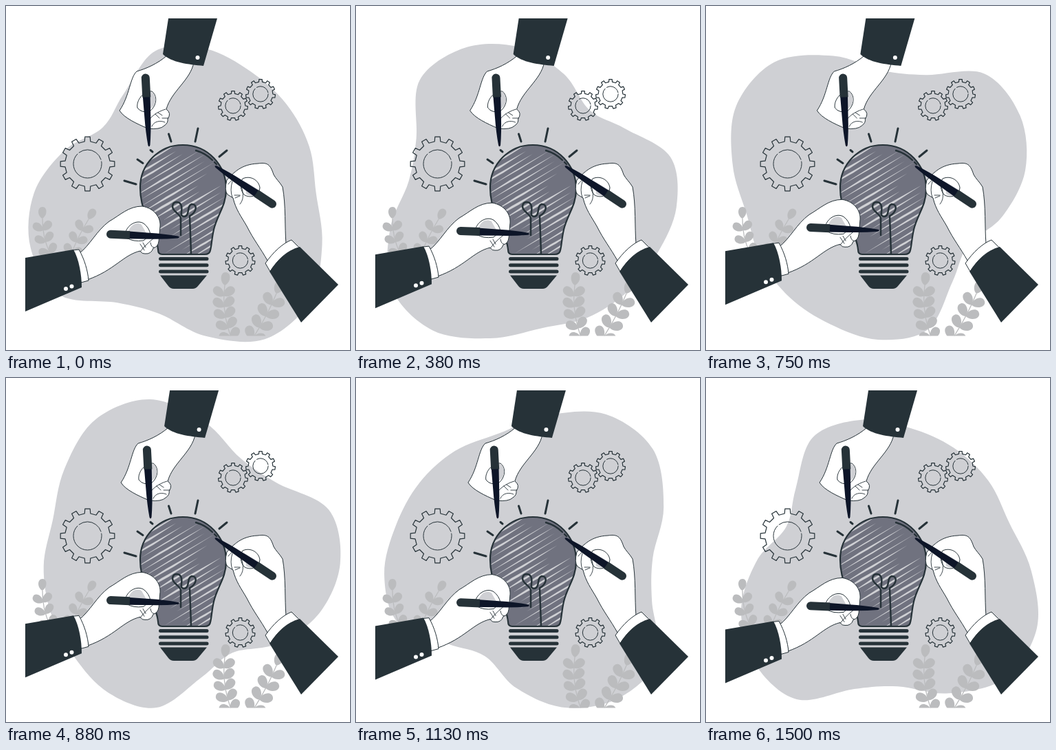
Write an HTML page that moves like this. It is 500 px wide and 500 px high and loops after 1540 ms.

```html
<!DOCTYPE html>
<html lang="en">
<head>
<meta charset="utf-8">
<title>Drawing an idea</title>
<style>
  html, body { margin: 0; width: 100%; height: 100%; overflow: hidden; background: #fff; }
  svg { display: block; width: 100vw; height: 100vh; }
  .line { fill: none; stroke: #263238; stroke-linecap: round; stroke-linejoin: round; }
  .skin { fill: #fff; stroke: #263238; stroke-linejoin: round; }
  .dark { fill: #263238; }
  .navy { fill: #0d1528; }
  .grey { fill: #cfd0d4; }
  .leaf { fill: #bbbcbe; }
  .stem { fill: none; stroke: #bbbcbe; }
</style>
</head>
<body>
<svg id="stage" viewBox="0 0 500 500"></svg>
<script>
const LOOP = 1540, FPS = 24, FRAMES = 37;
const DEG_PER_FRAME = 9.5;
const PIVOT = [253.7, 272];
const { PI, sin, cos, abs, min, floor, atan2 } = Math;

// Smooth closed curve through key points.
function smooth(points) {
  const n = points.length;
  const at = i => points[(i + n) % n];
  let d = `M${at(0)}`;
  for (let i = 0; i < n; i++) {
    const [a, b, e, f] = [at(i - 1), at(i), at(i + 1), at(i + 2)];
    const p = b.map((v, k) => v + (e[k] - a[k]) / 6);
    const q = e.map((v, k) => v - (f[k] - b[k]) / 6);
    d += `C${p} ${q} ${e}`;
  }
  return d + 'Z';
}

const polar = (cx, cy, r, a) => [cx + r * cos(a), cy + r * sin(a)];
const path = (cls, d, width = 1) => `<path class="${cls}" d="${d}" stroke-width="${width}"/>`;
const dot = (x, y) => `<circle cx="${x}" cy="${y}" r="3" fill="#fff"/>`;

// Radii of the background shape, one every 20 degrees.
const RADII = [197, 219, 245, 245, 211, 178, 184, 230, 232, 213, 180, 148, 166, 210, 213, 204, 201, 199];
const blob = smooth(RADII.map((r, i) => polar(...PIVOT, r, i * PI / 9)));

function gear(cx, cy, outer, teeth) {
  const step = 2 * PI / teeth, root = outer * .83, hole = outer * .52, turn = 2 * PI * hole;
  const pts = [];
  for (let i = 0; i < teeth; i++) {
    const a = i * step - PI / 2;
    pts.push(polar(cx, cy, root, a - step * .25), polar(cx, cy, outer, a - step * .18),
             polar(cx, cy, outer, a + step * .18), polar(cx, cy, root, a + step * .25));
  }
  return path('line', `M${pts.join('L')}Z`, 1.2) +
    `<circle class="line" cx="${cx}" cy="${cy}" r="${hole}" stroke-dasharray="${turn * .62} 3 ${turn * .3} 3"/>`;
}

// A curved stem with a leaf at its tip and pairs of leaves along it.
function sprig(x0, y0, x1, y1, bend, pairs, size) {
  const mx = (x0 + x1) / 2 + bend, my = (y0 + y1) / 2;
  const blade = (x, y, angle) => `<path class="leaf" transform="translate(${x} ${y}) rotate(${angle}) scale(${size})"
    d="M0 0C.2 -.45 1 -.5 1 0C1 .4 .3 .45 0 0"/>`;
  let out = path('stem', `M${x0} ${y0}Q${mx} ${my} ${x1} ${y1}`, 1.3);
  for (let i = 0; i <= pairs; i++) {
    const t = i / pairs, u = 1 - t;
    const x = u * u * x0 + 2 * u * t * mx + t * t * x1;
    const y = u * u * y0 + 2 * u * t * my + t * t * y1;
    const dir = atan2(u * (my - y0) + t * (y1 - my), u * (mx - x0) + t * (x1 - mx)) * 180 / PI;
    out += i < pairs ? blade(x, y, dir - 50) + blade(x, y, dir + 50) : blade(x, y, dir);
  }
  return out;
}

const pen = (x, y, angle) => `<g transform="translate(${x} ${y}) rotate(${angle})">
  ${path('navy', 'M30 -5.5L62 -4.5Q85 -4 104 -1.5Q108 0 104 1.5Q85 4 62 4.5L30 5.5Z')}
  ${path('dark', 'M6 -6H34V6H6A6 6 0 0 1 6 -6Z')}</g>`;

const glass = `M257 202C294 202 320 232 320 266C320 291 307 303 302 325C299 338 299 347 297 355
  Q296 361 289 361H227Q221 361 221 354C220 340 212 326 205 309C199 295 195 282 195 264C195 230 222 202 257 202Z`;

function bulb() {
  let seed = 11;
  const rand = () => (seed = seed * 16807 % 2147483647) / 2147483647;
  let streaks = '';
  for (let y = 190; y < 390; y += 8.5) {
    const x = 185 + rand() * 35, len = 75 + rand() * 70, w = 1.6 + rand() * 2.2;
    streaks += path('grey', `M${x} ${y}l${len * .4} ${-w / 2}l${len * .6} ${w / 2}l${-len * .5} ${w / 2}Z`);
  }
  const bars = [0, 1, 2].map(i => `M224.5 ${367.5 + i * 9.2}H292`).join('');
  return `<clipPath id="glass"><path d="${glass}"/></clipPath>
    <g clip-path="url(#glass)"><path d="${glass}" fill="#70727f"/>
    <g transform="rotate(-31 258 282)">${streaks}</g></g>` +
    path('line', glass, 2.2) +
    path('line', 'M276 210Q290 214 300 224M303 227l3 3', 2.4) +
    path('line', `M254 333V308C252 301 242 299 242 291C243 283 253 283 255 291C257 299 251 305 259 306
      C268 305 262 290 270 288C279 288 277 300 267 305L269 360`, 2.5) +
    path('line', bars, 5) +
    path('dark', 'M224 391.5H292L279 407Q276 411 271 411H244Q239 411 236 407Z');
}

const rays = path('line', `M172 254L189 259M191 223L199 228.5M210 209.5L213 212
  M236.5 186L240 197M279 178L275 197M321 210L310 219`, 3);

const leftHand =
  path('skin', `M106 360C122 348 132 326 150 313C166 304 178 291 198 291C216 294 225 308 224 320
    L222 342Q221 350 214 352Q211 361 202 360Q198 361 195 356C170 362 158 384 118 398Z`) +
  path('skin', 'M173 331C176 318 190 310 200 316Q208 322 210 332L200 341Q184 343 176 337') +
  path('grey', 'M178 328C181 318 190 313 197 318L205 332Z') +
  path('line', 'M195 357Q207 342 220 334M195 346l6 9M199 344l4 7M210 344Q211 351 215 351', .9) +
  path('skin', 'M97 355L106 354C114 368 119 385 120 399L109 402Z') +
  path('dark', 'M28 366L98 354C106 368 110 390 110 409L28 444Z') +
  dot(87, 411) + dot(95.5, 407.5) + pen(146, 331.5, 2.5);

const topHand =
  path('skin', `M234 72C220 84 204 91 190 95C180 104 180 130 165 152C172 163 190 171 206 178
    Q224 180 230 174Q236 170 235 164Q241 156 233 150C240 124 268 108 273 82Z`) +
  path('skin', 'M191 148C189 137 200 123 212 124C221 131 219 145 209 153Q197 156 191 148') +
  path('grey', 'M205 126Q212 122 216 130C220 139 215 147 207 151Z') +
  path('line', 'M205 172C207 163 218 154 232 150M212 175C215 167 225 166 231 169M217 157l6 6M221 155l6 4M227 163h9', .9) +
  path('dark', 'M236 18H307L287 87C265 85 240 82 228 70Z') +
  dot(278.5, 75) + pen(202.5, 98.5, 87);

const rightHand =
  path('skin', `M407 345C405 322 407 290 402 263C398 256 392 251 389 245C384 230 380 227 366 229
    C342 230 331 242 321 253Q317 268 322 274L330 279C334 296 342 306 350 320C360 340 370 352 380 370Z`) +
  path('skin', 'M344 251C354 246 367 252 369 264C368 275 357 280 347 275C341 270 339 257 344 251') +
  path('grey', 'M347 255L367 267C365 276 356 278 349 273Z') +
  path('line', 'M323 259C332 247 338 249 342 262C346 274 345 282 340 288M329 278Q325 268 329 255M332 275h8M333 279l7 -3', .9) +
  path('skin', 'M377 374C388 358 402 345 415 340L426 351C408 356 395 368 384 386Z') +
  path('dark', 'M383 386C395 368 410 355 427 350L483 405L429 460Z') +
  pen(392, 291, 213.5);

document.getElementById('stage').innerHTML =
  `<path id="blob" class="grey" d="${blob}"/>` +
  sprig(64, 360, 53, 309, -6, 3, 17) + sprig(95, 360, 120, 310, -3, 3, 17) +
  `<clipPath id="ground"><path d="M0 0H500V479.5H0Z"/></clipPath><g clip-path="url(#ground)">` +
  sprig(328, 484, 318, 406, -10, 5, 19) + sprig(358, 484, 393, 418, 4, 4, 20) + '</g>' +
  gear(118.5, 229.5, 39.5, 12) + gear(330, 145, 21.5, 11) +
  gear(370, 128, 21.5, 11) + gear(340.5, 370, 21.5, 11) +
  rays + bulb() +
  `<g id="left">${leftHand}</g><g id="top">${topHand}</g>${rightHand}`;

const [blobEl, leftEl, topEl] = ['blob', 'left', 'top'].map(id => document.getElementById(id));

function draw(now) {
  const frame = min(FRAMES - 1, floor(now % LOOP / 1000 * FPS + .15));
  const phase = frame / FRAMES;
  const lift = 10 * (1 - abs(1 - 2 * phase));
  const shake = 4 * cos(10 * PI * phase) * min(1, 1.56 * sin(PI * phase) ** 2);
  blobEl.setAttribute('transform', `rotate(${frame * DEG_PER_FRAME} ${PIVOT})`);
  leftEl.setAttribute('transform', `translate(0 ${-lift})`);
  topEl.setAttribute('transform', `translate(${shake} 0)`);
}

const start = performance.now();
function tick() {
  draw(performance.now() - start);
  requestAnimationFrame(tick);
}
tick();
</script>
</body>
</html>
```
